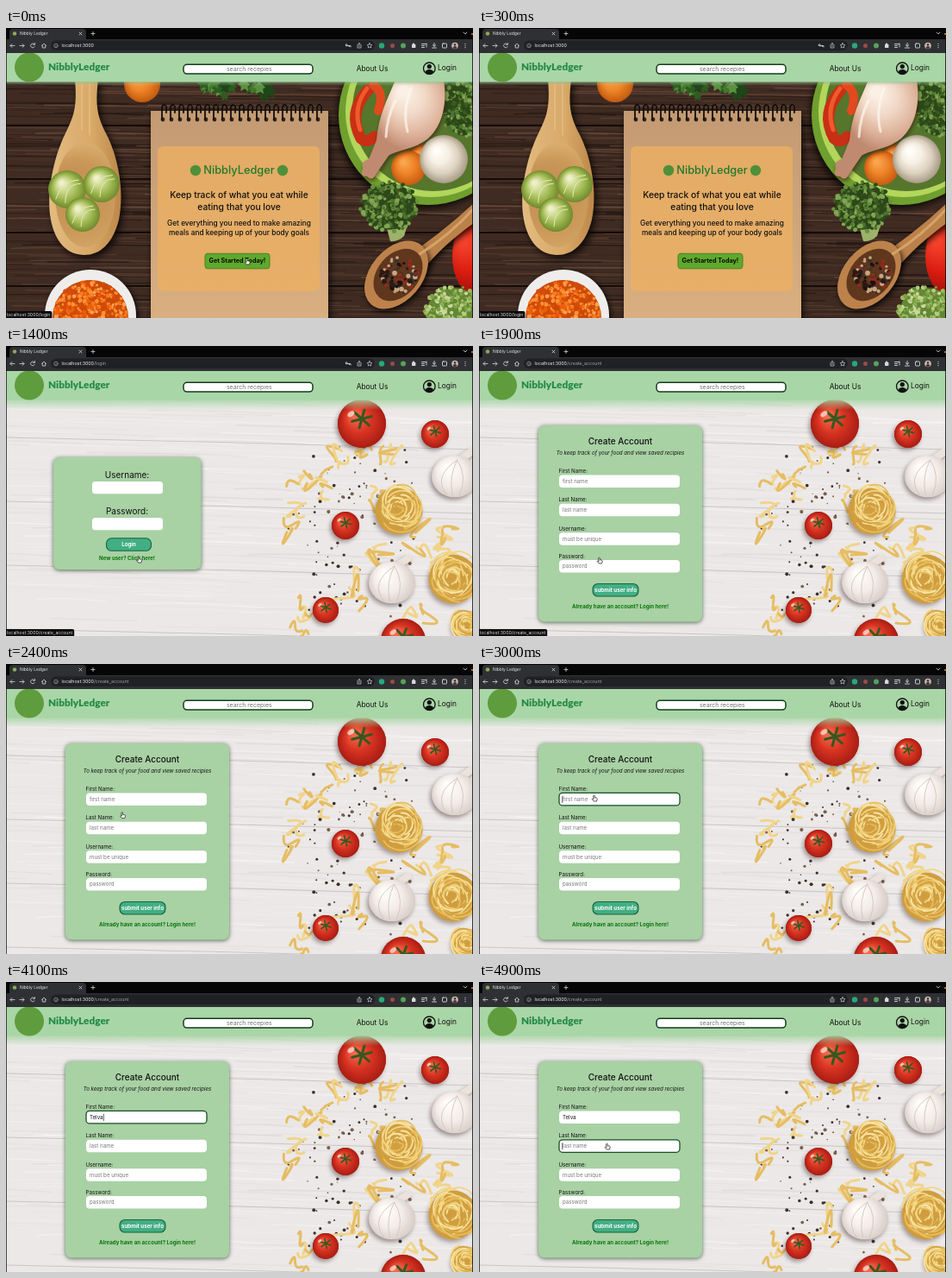
Animation of 542 by 336 pixels, one loop 5 s. Source, as an HTML page with a canvas:

```html
<!DOCTYPE html>
<html lang="en">
<head>
<meta charset="utf-8">
<title>Nibbly Ledger</title>
<style>
html, body { margin: 0; width: 100%; height: 100%; overflow: hidden; background: #000; }
canvas { display: block; width: 542px; height: 336px; }
</style>
</head>
<body>
<canvas id="stage"></canvas>
<script>
const W = 542, H = 336, LOOP = 5000;
const LOGIN_AT = 600, CREATE_AT = 1500, FOCUS_AT = 2600;
const TYPE_AT = 3300, KEY_MS = 130, NEXT_AT = 4700;
const BRAND = 'NibblyLedger', FIRST = 'Telva';
const GREEN = '#a9d6a6', INK = '#111';
const dpr = window.devicePixelRatio || 1;
const stage = document.getElementById('stage');
let g;

function context(canvas) {
  canvas.width = W * dpr;
  canvas.height = H * dpr;
  const c = canvas.getContext('2d');
  c.scale(dpr, dpr);
  return c;
}

function seeded(seed) {
  return () => {
    seed = (seed * 1664525 + 1013904223) >>> 0;
    return seed / 4294967296;
  };
}

function text(s, x, y, size, color = INK, { w = 400, align = 'left', style = 'normal', face = 'Inter' } = {}) {
  g.font = `${style} ${w} ${size}px ${face}, "Liberation Sans", sans-serif`;
  g.fillStyle = color;
  g.textAlign = align;
  g.textBaseline = 'middle';
  g.fillText(s, x, y);
}
const centred = (s, x, y, size, color, w = 400, style = 'normal') =>
  text(s, x, y, size, color, { w, align: 'center', style });

function rect(x, y, w, h, color) {
  g.fillStyle = color;
  g.fillRect(x, y, w, h);
}

function box(x, y, w, h, r, fill, stroke, lw = 1) {
  g.beginPath();
  g.roundRect(x, y, w, h, r);
  if (fill) { g.fillStyle = fill; g.fill(); }
  if (stroke) { g.strokeStyle = stroke; g.lineWidth = lw; g.stroke(); }
}

function oval(x, y, rx, ry, color, turn = 0) {
  g.beginPath();
  g.ellipse(x, y, rx, ry, turn, 0, 7);
  g.fillStyle = color;
  g.fill();
}
const dot = (x, y, r, color) => oval(x, y, r, r, color);

function line(d, color, lw = 1, fill) {
  const p = new Path2D(d);
  if (fill) { g.fillStyle = fill; g.fill(p); }
  if (!color) return;
  g.strokeStyle = color;
  g.lineWidth = lw;
  g.lineCap = g.lineJoin = 'round';
  g.stroke(p);
}
const shape = (d, fill) => line(d, null, 0, fill);

function glow(x, y, r, ...colors) {
  const s = g.createRadialGradient(x - r * .3, y - r * .35, r * .1, x, y, r);
  colors.forEach((c, i) => s.addColorStop(i / (colors.length - 1), c));
  return s;
}
const ball = (x, y, r, ...colors) => dot(x, y, r, glow(x, y, r, ...colors));

function shaded(draw, color, blur, dx = 0, dy = 0) {
  g.save();
  g.shadowColor = color;
  g.shadowBlur = blur * dpr;
  g.shadowOffsetX = dx * dpr;
  g.shadowOffsetY = dy * dpr;
  draw();
  g.restore();
}

function cluster(x, y, rx, ry, n, size, colors, seed) {
  const rnd = seeded(seed);
  for (let i = 0; i < n; i++) {
    const a = rnd() * 6.283, d = Math.sqrt(rnd());
    dot(x + Math.cos(a) * d * rx, y + Math.sin(a) * d * ry,
      size * (.6 + rnd() * .6), colors[Math.floor(rnd() * colors.length)]);
  }
}

const DEEP = ['#3a5a20', '#4f7430', '#68903f', '#2c4819', '#82a553'];
const PALE = ['#7c9f45', '#9ab95c', '#b6cd7e', '#628735', '#cbd9a0'];

function broccoli(x, y, rx, ry, colors, seed) {
  oval(x, y, rx * .92, ry * .92, colors[3]);
  cluster(x, y, rx, ry, 260, 2.4, colors, seed);
}

function grain(n, colors, seed, tilt, strength) {
  const rnd = seeded(seed);
  for (let i = 0; i < n; i++) {
    const x = rnd() * W - 80, y = 55 + rnd() * 285, len = 60 + rnd() * 200;
    g.globalAlpha = strength * (.3 + rnd() * .7);
    line(`M${x} ${y}q${len / 2} ${rnd() * 6 - 3} ${len} ${tilt * len}`,
      colors[i % colors.length], .5 + rnd() * 1.4);
  }
  g.globalAlpha = 1;
}

function sprout(x, y, r) {
  ball(x, y, r, '#eef0c8', '#c6d486', '#98b34a', '#70892f');
  line(`M${x - r * .6} ${y + r * .5}q${r * .3} ${-r} ${r * 1.2} ${-r}M${x - r * .1} ${y + r * .7}q0 ${-r} ${r * .8} ${-r}`, '#e4ebb4', 1);
}

function parsley() {
  const rnd = seeded(11);
  for (let i = 0; i < 26; i++) {
    const x = 226 + rnd() * 98, y = 62 + rnd() * 20 * Math.sin((x - 216) / 38), s = 5 + rnd() * 4;
    shape(`M${x} ${y - s}l${s} ${s}l${-s * .4} ${s * .2}l${s * .1} ${s * .8}l${-s * .6} ${-s * .4}l${-s * .6} ${s * .4}l0 ${-s * .8}l${-s * .5} ${-s * .3}Z`,
      ['#2d5c20', '#43782d', '#1f4618', '#5c9040'][i % 4]);
  }
}

function vegetableBowl() {
  shaded(() => dot(490, 101, 104, '#6f9f2e'), 'rgba(0,0,0,.8)', 8, -2, 4);
  dot(493, 97, 99, '#b3d65c');
  dot(496, 95, 94, '#55762b');
  broccoli(530, 88, 25, 40, DEEP, 12);
  line('M420 72Q396 98 412 128Q420 134 427 126', '#c92f14', 13);
  line('M419 70Q402 92 411 118', '#ef5a2c', 5);
  line('M426 66Q440 74 432 96', '#e2491f', 10);
  ball(484, 152, 17, '#f6a04b', '#ea7f27', '#b9510f');
  ball(467, 162, 20, '#f9a650', '#ee8327', '#c75b12');
  const meat = glow(476, 92, 52, '#fbf0e6', '#f1d9c8', '#dfb49c', '#c08a70');
  shaded(() => shape('M452 60H508C512 84 508 112 490 128C474 141 454 141 444 148L429 170Q425 178 419 172Q410 172 414 163Q411 155 421 152L430 130C432 102 442 84 452 60Z', meat),
    'rgba(50,20,10,.6)', 5, 1, 3);
  line('M452 84Q442 104 441 126M470 70Q460 96 466 120', 'rgba(255,248,240,.7)', 3);
  ball(508, 152, 28, '#fffdf8', '#f6f0e5', '#ddd2c0', '#a79a86');
}

function pepperSpoon() {
  shaded(() => {
    shape('M468 262C493 246 518 226 546 200V224C523 240 502 258 482 282Z', '#bb814a');
    oval(453, 286, 30, 45, '#bd824b', .7);
  }, 'rgba(0,0,0,.8)', 7, 2, 3);
  line('M480 262Q515 240 542 210', '#d6a268', 3);
  oval(455, 286, 24, 34, '#5e371d', .7);
  cluster(456, 286, 22, 21, 110, 2.5, ['#2b1a15', '#5d3526', '#8f2c1c', '#c7a682', '#3b3328', '#191210'], 5);
}

function notebook() {
  const paper = g.createLinearGradient(0, 96, 0, 336);
  paper.addColorStop(0, '#c39a72');
  paper.addColorStop(1, '#d9af82');
  shaded(() => rect(168, 96, 206, 250, paper), 'rgba(0,0,0,.8)', 8, 2, 3);
  for (let x = 181; x < 368; x += 10) {
    dot(x + 1, 106, 2.4, '#33241b');
    line(`M${x} 106V93q0 -4 3 -4q3 1 2 6v3`, '#12100f', 1.8);
  }
}

function darkTable() {
  rect(0, 0, W, H, '#3f2b22');
  grain(520, ['#150d0a', '#6b4a39', '#21140f', '#7d5a46', '#4f3529'], 7, .01, .6);
  for (let y = 112; y < H; y += 62) rect(0, y, W, 2, '#140c09');

  ball(158, 65, 21, '#f9a24a', '#ee8526', '#c25a10');
  parsley();

  const wood = g.createLinearGradient(50, 0, 133, 0);
  wood.addColorStop(0, '#e3bb80');
  wood.addColorStop(.6, '#d8a968');
  wood.addColorStop(1, '#bd8748');
  shaded(() => shape('M80 60H107C103 92 107 104 116 122C130 148 138 190 131 222C124 250 109 263 91 263C72 263 57 249 52 222C46 190 56 148 69 122C78 104 83 92 80 60Z', wood),
    'rgba(0,0,0,.8)', 8, 3, 4);
  oval(92, 193, 35, 61, glow(92, 205, 70, '#c18e52', '#c99758', '#d9ad6d'));
  line('M88 64V118M97 64V124', '#e6c08a', 1.2);
  sprout(71, 187, 22);
  sprout(111, 181, 21);
  sprout(89, 216, 20);

  shaded(() => dot(98, 333, 53, '#efedeb'), 'rgba(0,0,0,.8)', 7, 2, 2);
  dot(98, 336, 44, '#c94a08');
  cluster(98, 336, 43, 43, 520, 2.1, ['#f47a1a', '#ed5f0d', '#ff9135', '#d84a0a', '#f9a35a'], 9);

  vegetableBowl();
  shape('M437 214L446 247Q455 248 462 241L470 215Z', '#9db36a');
  broccoli(445, 207, 34, 29, DEEP, 20);
  oval(545, 264, 27, 46, glow(545, 264, 50, '#f4412a', '#da1d10', '#96100a'));
  broccoli(520, 328, 34, 29, PALE, 31);
  pepperSpoon();
  notebook();
}

function tomato(x, y, r) {
  shaded(() => dot(x, y, r, '#b92417'), 'rgba(60,40,40,.45)', 5, -2, 3);
  ball(x, y, r, '#f4694b', '#d93422', '#a81d13');
  for (let i = 0; i < 6; i++) {
    const a = i * 1.047 + r;
    line(`M${x} ${y - r * .2}l${Math.cos(a) * r * .42} ${Math.sin(a) * r * .38}`, '#38571f', r * .11);
  }
  oval(x - r * .45, y - r * .4, r * .16, r * .1, 'rgba(255,235,225,.7)', -.6);
}

function garlic(x, y, r) {
  const skin = glow(x, y, r * 1.1, '#fffdfb', '#f3ece8', '#d3c6c0');
  shaded(() => {
    line(`M${x} ${y - r * .5}Q${x + r * .3} ${y - r * .8} ${x + r * .7} ${y - r * 1.05}`, '#ece2dc', r * .32);
    oval(x, y, r, r * .9, skin);
  }, 'rgba(60,40,40,.45)', 5, -2, 3);
  for (const k of [-.7, -.2, .4]) {
    line(`M${x + r * .1} ${y - r * .7}Q${x + k * r * 1.4} ${y} ${x + k * r * .5} ${y + r * .8}`, '#d2c4bd', .9);
  }
}

function nest(x, y, r, seed) {
  const rnd = seeded(seed);
  shaded(() => dot(x, y, r * .86, '#cf9d3f'), 'rgba(60,40,40,.4)', 5, -2, 3);
  for (let i = 0; i < 34; i++) {
    const a = rnd() * 6.283, q = r * (.25 + rnd() * .65);
    g.beginPath();
    g.ellipse(x + (rnd() - .5) * r * .35, y + (rnd() - .5) * r * .35, q, q * (.6 + rnd() * .4), a, a, a + 1.5 + rnd() * 2);
    g.strokeStyle = ['#f3d682', '#e7bd5c', '#f8e2a0', '#d2a143'][i % 4];
    g.lineWidth = 1.8;
    g.stroke();
  }
}

function scrap(x, y, s, seed) {
  const rnd = seeded(seed);
  for (let i = 0; i < 4; i++) {
    const k = () => (rnd() - .5) * s * 1.7;
    line(`M${x + k()} ${y + k()}q${k()} ${k()} ${k()} ${k()}t${k()} ${k()}`, i % 2 ? '#e6bd63' : '#f1d48a', 3);
  }
}

function lightTable() {
  rect(0, 0, W, H, '#ebe8e7');
  grain(200, ['#fbfaf9', '#d2cdcb', '#f6f4f3', '#dcd8d6'], 3, .03, .5);
  for (let y = 106; y < H; y += 74) line(`M0 ${y}Q270 ${y + 5} 542 ${y + 14}`, '#cbc6c4', 1);

  const rnd = seeded(44);
  for (let i = 0; i < 105; i++) {
    const y = 110 + rnd() * 205;
    const x = 400 + (rnd() + rnd() - 1) * 85;
    dot(x, y, .6 + rnd() * 1.5, i % 3 ? '#3c302c' : '#7b5f4c');
  }
  [[393, 132, 17], [446, 130, 16], [413, 118, 11], [345, 156, 11], [337, 208, 16], [372, 160, 12],
   [424, 236, 15], [484, 232, 19], [405, 284, 17], [347, 309, 11], [342, 329, 12], [506, 222, 16],
   [429, 174, 11], [477, 306, 14]].forEach(([x, y, s], i) => scrap(x, y, s, 17 + i * 9));
  nest(456, 191, 32, 6);
  nest(519, 270, 33, 15);
  nest(535, 324, 20, 25);
  tomato(413, 90, 28);
  tomato(498, 102, 16);
  tomato(394, 208, 16);
  tomato(371, 306, 15);
  tomato(461, 342, 26);
  garlic(521, 151, 27);
  garlic(448, 274, 27);
}

function backdrop(draw) {
  const c = document.createElement('canvas');
  g = context(c);
  draw();
  return c;
}
const homePhoto = backdrop(darkTable);
const formPhoto = backdrop(lightTable);
const screen = context(stage);

function chrome(path, key) {
  rect(0, 0, W, 13, '#060607');
  box(4, 1, 89, 16, 4, '#2f3033');
  rect(0, 13, W, 16, '#2f3033');
  dot(10, 6.5, 2.3, '#8fa65c');
  text('Nibbly Ledger', 16, 6.8, 4.9, '#e4e4e4');
  line('M85 5l3 3m0 -3l-3 3M99 6.5h4m-2 -2v4M531 5l2 2l2 -2', '#d6d6d6', .8);
  box(52, 14.5, 376, 11.5, 6, '#202124');
  line('M10 20.5h-5m2 -2l-2 2l2 2M16 20.5h5m-2 -2l2 2l-2 2M33 19a2.4 2.4 0 1 0 .2 2.5M33.4 17.5v1.8h-1.8M41.5 20.5l2.5 -2.5l2.5 2.5M42.3 20v3h3.4v-3', '#d8d8d8', .8);
  line('M60.3 20.5a2.3 2.3 0 1 0 -4.6 0a2.3 2.3 0 1 0 4.6 0M58 20.3v1.2', '#b9bbbe', .6);
  text('localhost:3000', 64.5, 20.5, 5.3, '#f1f1f1');
  const w = g.measureText('localhost:3000').width;
  text(path, 64.5 + w, 20.5, 5.3, '#a3a5a8');
  if (key) line('M396 20.5a1 1 0 1 0 -.1 .1H400v1.3M398.5 20.5v1', '#dadada', .9);
  line('M408 19.5v3.5h4v-3.5M410 21.5v-4m-1.3 1.2l1.3 -1.2l1.3 1.2', '#cfcfcf', .7);
  line('M422 17.5l.9 1.9l2 .2l-1.5 1.4l.4 2l-1.8 -1l-1.8 1l.4 -2l-1.5 -1.4l2 -.2Z', '#cfcfcf', .7);
  dot(436, 20.5, 3.2, '#28a878');
  dot(448.5, 20.5, 2.5, '#9d4a46');
  dot(461, 20.5, 3, '#55a35b');
  box(471, 18.7, 4.4, 4.4, .7, '#d7d7d7');
  dot(473, 18.5, 1.1, '#d7d7d7');
  line('M482.5 18.5h5m-5 2h3m-3 2h3M488 18v4M497 17.5v3.7m-1.8 -1.6l1.8 1.7l1.8 -1.7M494.5 23h5', '#d7d7d7', .9);
  box(506.5, 18, 5, 5, .8, null, '#d7d7d7', .9);
  dot(521, 20.5, 3.8, '#c9b9b4');
  dot(521, 19.4, 1.3, '#4b3734');
  oval(521, 22.6, 2.2, 1.6, '#4b3734');
  for (const y of [18.3, 20.5, 22.7]) dot(533, y, .6, '#dedede');
  rect(0, 0, .7, H, '#0a0a0a');
  rect(W - .8, 0, .8, H, '#0a0a0a');
  dot(541, 7, 1, '#e58a2a');
}

function navBar(home) {
  const fade = g.createLinearGradient(0, 61, 0, home ? 67 : 74);
  fade.addColorStop(0, home ? 'rgba(130,165,125,.75)' : 'rgba(169,214,166,.95)');
  fade.addColorStop(1, 'rgba(169,214,166,0)');
  rect(0, 61, W, 14, fade);
  rect(0, 28, W, 34.5, GREEN);
  dot(27, 45.5, 17, '#5f9c3d');
  text(BRAND, 49, 45.7, 11.8, '#23894a', { w: 900, face: 'Lato' });
  box(206, 42.3, 150, 10.8, 4, '#fff', '#153c1d', 1.5);
  centred('search recepies', 282.3, 47.8, 7, '#737373');
  centred('About Us', 425, 47, 8.4, INK);
  g.save();
  g.beginPath();
  g.arc(491.3, 46.8, 6.8, 0, 7);
  g.strokeStyle = INK;
  g.lineWidth = 1.3;
  g.stroke();
  g.clip();
  dot(491.3, 44.6, 2.6, INK);
  oval(491.3, 52.1, 5, 4, INK);
  g.restore();
  text('Login', 501, 46.4, 8.4);
}

function status(path) {
  const s = 'localhost:3000' + path;
  g.font = '400 5.2px Inter, "Liberation Sans", sans-serif';
  box(-3, 328, g.measureText(s).width + 6, 11, 2, '#0d0d0e');
  text(s, 1, 332.3, 5.2, '#dcdcdc');
}

function homePage() {
  box(176, 137, 188, 168, 6, 'rgba(236,176,98,.78)');
  dot(220, 165, 6.2, '#4f8f3a');
  dot(321, 165, 6.2, '#4f8f3a');
  centred(BRAND, 270.5, 164.8, 12.8, '#1f7a2c', 500);
  centred('Keep track of what you eat while', 270.5, 194.2, 10.3, INK, 500);
  centred('eating that you love', 270.5, 207.8, 10.3, INK, 500);
  centred('Get everything you need to make amazing', 270.5, 226.6, 8.3, INK, 500);
  centred('meals and keeping up of your body goals', 270.5, 237.4, 8.3, INK, 500);
  box(231, 261.3, 75, 17.5, 3, '#60a82d', '#4a8425');
  centred('Get Started Today!', 268.4, 270.2, 7.2, '#071006', 700);
}

const card = (x, y, w, h) =>
  shaded(() => box(x, y, w, h, 7, '#a8d1a4'), 'rgba(30,60,30,.75)', 5, 0, 1);

function button(s, x, y, w) {
  box(x, y, w, 14.5, 6, '#42ae83', '#17643a', 1.1);
  centred(s, x + w / 2, y + 7.3, 6.2, '#fff', 700);
}

function loginPage() {
  card(55, 129, 171.5, 130);
  centred('Username:', 140.5, 149.7, 10, INK);
  box(100, 157, 82, 14.3, 3.5, '#fff');
  centred('Password:', 140.5, 192, 10, INK);
  box(100, 199, 82, 14.3, 3.5, '#fff');
  button('Login', 116.5, 222.8, 52);
  centred('New user? Click here!', 140.5, 246.3, 6.1, '#087508', 700);
}

function field(label, hint, y, value, focused, caret) {
  text(label, 92.5, y - 4.3, 6.2);
  box(93, y, 140, 14.5, 4, '#fff', focused ? '#164f23' : null, 1.3);
  text(value || hint, 97, y + 7.5, 6.2, value ? '#151515' : '#777');
  if (focused && caret) rect(97 + (value ? g.measureText(value).width + .3 : -.5), y + 3.5, .7, 8, '#111');
}

function createPage(t) {
  const typed = t < TYPE_AT ? 0 : Math.min(FIRST.length, Math.floor((t - TYPE_AT) / KEY_MS) + 1);
  const typedAt = TYPE_AT + (FIRST.length - 1) * KEY_MS;
  const onFirst = t >= FOCUS_AT && t < NEXT_AT, onLast = t >= NEXT_AT;
  const since = onLast ? t - NEXT_AT : t >= typedAt ? t - typedAt : t >= TYPE_AT ? 0 : t - FOCUS_AT;
  const caret = since % 1000 < 500;
  card(69, 92, 190, 227.5);
  centred('Create Account', 164, 110.5, 10, INK, 500);
  centred('To keep track of your food and view saved recipies', 164, 124.3, 6.15, INK, 400, 'italic');
  field('First Name:', 'first name', 149.4, FIRST.slice(0, typed), onFirst, caret);
  field('Last Name:', 'last name', 182.8, '', onLast, caret);
  field('Username:', 'must be unique', 216.3, '');
  field('Password:', 'password', 248, '');
  button('submit user info', 132, 275.5, 53);
  centred('Already have an account? Login here!', 164, 302.3, 6.1, '#087508', 700);
}

// Pointer path: time, x, y
const moves = [
  [600, 280, 270], [900, 179, 261], [1250, 155, 247], [1500, 154, 247], [1900, 140, 248],
  [2050, 140, 247], [2550, 134, 155], [4250, 134, 155], [4650, 149, 190], [5000, 149, 190]
];

function pointerAt(t) {
  const i = moves.findIndex(m => m[0] >= t);
  const b = moves[i], a = moves[Math.max(0, i - 1)];
  const u = a === b ? 0 : (t - a[0]) / (b[0] - a[0]);
  const e = u * u * (3 - 2 * u);
  return [a[1] + (b[1] - a[1]) * e, a[2] + (b[2] - a[2]) * e];
}

function pointer(t) {
  if ((t >= 200 && t < LOGIN_AT) || (t >= TYPE_AT - 50 && t < 4300)) return;
  const [x, y] = pointerAt(t);
  g.save();
  g.translate(x, y);
  if (t >= LOGIN_AT && t < 1150) line('M0 -2v6l1.4 -1.2l1 2.2l.9 -.4l-1 -2.1h1.9Z', '#fff', .5, '#111');
  else line('M-1.2 -2.5q.8 -.8 1.4 0v2.2l2.3 .5q1 .4 .7 1.5l-.7 2.3h-3.3l-2 -2.5q0 -1 1.6 -.2Z', '#111', .7, '#fff');
  g.restore();
}

function draw(t) {
  g = screen;
  const home = t < LOGIN_AT, login = !home && t < CREATE_AT;
  g.drawImage(home ? homePhoto : formPhoto, 0, 0, W, H);
  navBar(home);
  chrome(home ? '' : login ? '/login' : '/create_account', home || login);
  if (home) homePage();
  else if (login) loginPage();
  else createPage(t);
  if (home) status('/login');
  else if (t >= 1250 && t < 2200) status('/create_account');
  pointer(t);
}

const start = performance.now();
function tick() {
  draw((performance.now() - start) % LOOP);
  requestAnimationFrame(tick);
}
tick();
</script>
</body>
</html>
```
